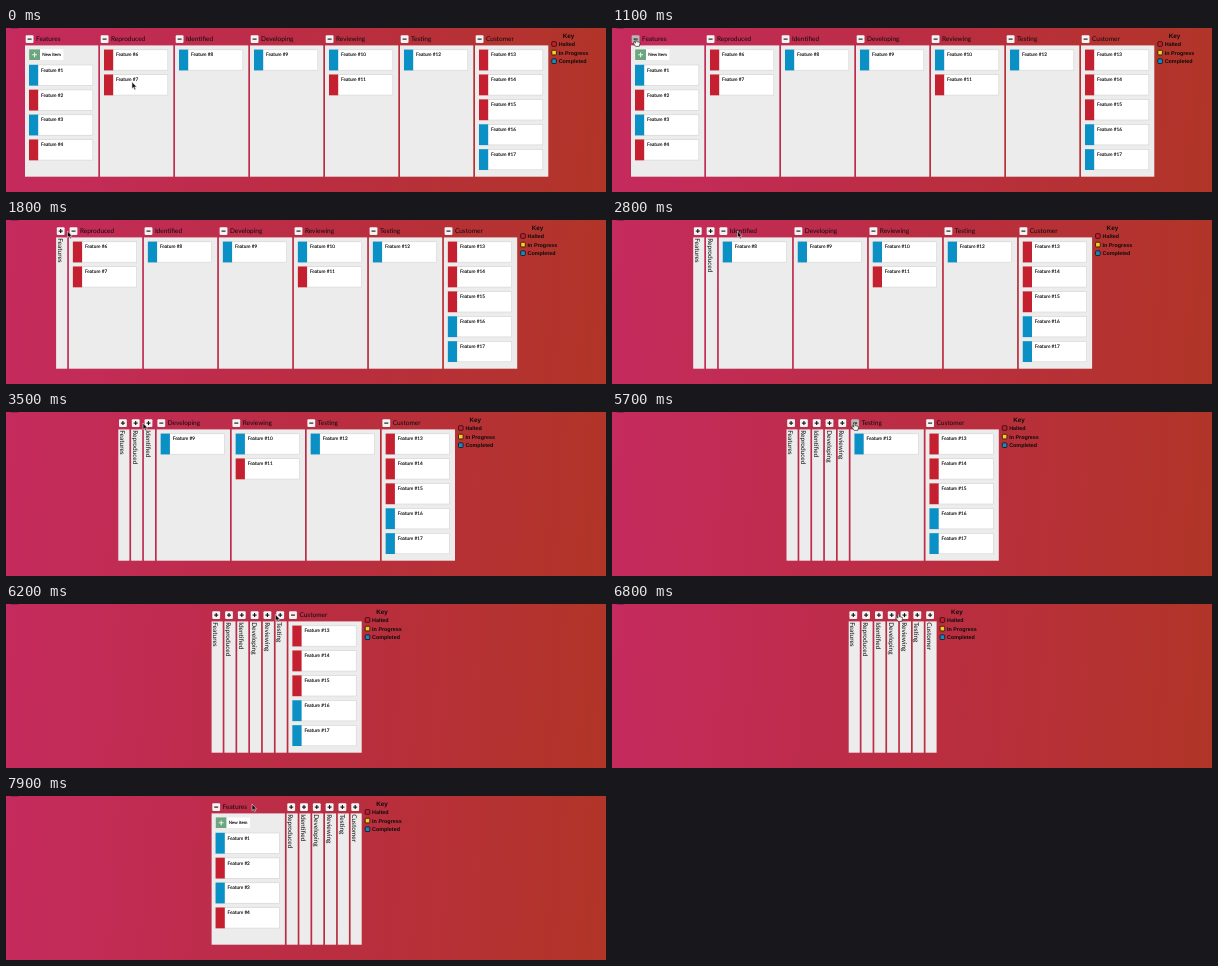
Animation, 600 px wide and 164 px high, one loop 8000 ms. Source, as an HTML page:

```html
<!DOCTYPE html>
<html lang="en">
<head>
<meta charset="utf-8">
<title>Collapsing board</title>
<style>
html, body { margin: 0; width: 100%; height: 100%; overflow: hidden; }
body { background: linear-gradient(94deg, #c52b5e, #bb2d43 50%, #b13527); }
svg { display: block; width: 600px; height: 164px; }
text { font-family: Lato, "Open Sans", sans-serif; fill: #0c0c0c; text-rendering: geometricPrecision; }
.title { font-size: 6.5px; }
.label { font-size: 4.7px; stroke: #0c0c0c; stroke-width: .12px; }
.key text { font-family: "Liberation Sans", Arial, sans-serif; font-weight: 700; font-size: 5.4px; }
.key .head { font-size: 6.3px; text-anchor: middle; }
</style>
</head>
<body>
<svg id="stage" viewBox="0 0 600 164"></svg>
<script>
const LOOP = 8000, OPEN = 75, SHUT = 12.8, GAP = 1.7;
const RED = '#c5202f', BLUE = '#0a90c4', YELLOW = '#f8d01c';

// Column title, first feature number, card colours
const columns = [
  ['Features', 1, 'brbr'],
  ['Reproduced', 6, 'rr'],
  ['Identified', 8, 'b'],
  ['Developing', 9, 'b'],
  ['Reviewing', 10, 'br'],
  ['Testing', 12, 'b'],
  ['Customer', 13, 'rrrbb']
];

// Clicks as [time, column]; each one toggles its column
const clicks = [[1300, 0], [2200, 1], [3100, 2], [4000, 3], [4900, 4], [5800, 5], [6600, 6], [7500, 0]];

// Pointer path as [time, x, y]
const path = [
  [0, 126, 54], [300, 126, 54], [950, 24, 11], [1400, 24, 11],
  [1800, 61.5, 11], [2000, 67, 11], [2350, 67, 11],
  [2700, 125.5, 11], [2800, 125.5, 11], [3000, 111.5, 11], [3250, 111.5, 11],
  [3700, 155, 11], [4000, 155, 11], [4300, 154, 11], [4400, 154, 11],
  [4750, 199, 11], [5050, 199, 11], [5450, 242.5, 11], [6000, 242.5, 11],
  [6350, 286.5, 10], [6850, 286.5, 10], [7250, 241.5, 11], [7600, 241.5, 11],
  [7900, 246, 8], [8000, 246, 8]
];

const stage = document.getElementById('stage');

function add(parent, tag, attrs = {}, text) {
  const el = document.createElementNS('http://www.w3.org/2000/svg', tag);
  for (const k in attrs) el.setAttribute(k, attrs[k]);
  if (text) el.textContent = text;
  parent.appendChild(el);
  return el;
}

const rect = (parent, x, y, width, height, fill, extra) =>
  add(parent, 'rect', { x, y, width, height, fill, ...extra });

function addCard(parent, y, color, number) {
  rect(parent, 4.2, y, 63.6, 20.4, '#fff', { stroke: '#d2d2d2', 'stroke-width': .6 });
  rect(parent, 4, y - .2, 9.2, 20.8, color);
  add(parent, 'text', { x: 16, y: y + 6.6, class: 'label' }, 'Feature #' + number);
}

function addNewItem(parent) {
  rect(parent, 4.2, 21.4, 10.8, 10.6, '#6ca67f');
  add(parent, 'path', { d: 'M9.6 24.4v4.8M7.2 26.8h4.8', stroke: '#e8f3ea', 'stroke-width': 1.1 });
  rect(parent, 15, 21.4, 23.4, 10.6, '#fff');
  add(parent, 'text', { x: 17.2, y: 28.3, class: 'label', style: 'font-size:4.4px' }, 'New item');
}

function addColumn([title, first, colors], index) {
  const root = add(stage, 'g');
  const open = add(root, 'g'), shut = add(root, 'g');
  rect(open, 0, 17.4, OPEN - GAP, 131.3, '#ececec');
  rect(shut, 0, 17.4, SHUT - GAP, 131.3, '#ececec');
  add(open, 'text', { x: 11, y: 13.3, class: 'title' }, title);
  add(shut, 'text', { class: 'title', transform: 'translate(1.7 18.2) rotate(90)' }, title);
  if (index === 0) addNewItem(open);
  const top = index === 0 ? 37 : 21.8;
  [...colors].forEach((c, i) => addCard(open, top + i * 24.9, c === 'r' ? RED : BLUE, first + i));
  const button = rect(root, .7, 7.2, 7.8, 7.8, '#f4f4f4', { rx: 1 });
  const sign = { stroke: '#111', 'stroke-width': 1.1 };
  add(root, 'path', { d: 'M2.6 11.1h4', ...sign });
  add(shut, 'path', { d: 'M4.6 9.1v4', ...sign });
  root.appendChild(shut);
  return { root, open, shut, button };
}

function addKey() {
  const g = add(stage, 'g', { class: 'key' });
  add(g, 'text', { x: 18.6, y: 10.3, class: 'head' }, 'Key');
  [['Halted', RED], ['In Progress', YELLOW], ['Completed', BLUE]].forEach(([name, color], i) => {
    const y = 16 + i * 8.6;
    rect(g, 1.8, y - 2.3, 4.6, 4.6, color, { stroke: '#1a1014', 'stroke-width': .8, rx: .8 });
    add(g, 'text', { x: 8.7, y: y + 1.9 }, name);
  });
  return g;
}

rect(stage, 5, 0, 7, 1, '#5a1a35', { opacity: .45 });
const views = columns.map(addColumn);
const key = addKey();
const outline = { 'stroke-width': .6, 'stroke-linejoin': 'round' };
const arrow = add(stage, 'path', {
  d: 'M0 0V6.6L1.5 5.3L2.6 7.7L3.7 7.2L2.6 4.9H4.6Z', fill: '#0a0a0a', stroke: '#e8d8dc', ...outline
});
const hand = add(stage, 'path', {
  d: 'M-.7 0Q0-.9 .7 0V2.6L3.6 3.3Q4.2 3.6 4 4.6L3.3 7.4H-.4L-2.4 4.5Q-2-.1-.7 4.2Z',
  fill: '#f4f4f4', stroke: '#161616', ...outline
});

function pointerAt(t) {
  const i = path.findIndex(p => p[0] > t);
  const [t0, x0, y0] = path[i - 1], [t1, x1, y1] = path[i];
  const p = (t - t0) / (t1 - t0), e = p * p * (3 - 2 * p);
  return [x0 + (x1 - x0) * e, y0 + (y1 - y0) * e];
}

const show = (el, on) => el.setAttribute('visibility', on ? 'visible' : 'hidden');
const move = (el, x, y = 0) => el.setAttribute('transform', `translate(${x} ${y})`);

function draw(t) {
  const opened = columns.map(() => true);
  const done = clicks.filter(c => c[0] <= t);
  for (const [, i] of done) opened[i] = !opened[i];

  const [px, py] = pointerAt(t);
  const shutCount = opened.filter(o => !o).length;
  let x = 19 + shutCount * (OPEN - SHUT) / 2;
  let pointing = done.length > 0 && t - done[done.length - 1][0] < 250;
  views.forEach((v, i) => {
    move(v.root, x);
    show(v.open, opened[i]);
    show(v.shut, !opened[i]);
    const over = px > x + .7 && px < x + 8.5 && py > 7 && py < 15;
    v.button.setAttribute('fill', over ? '#b9b4b6' : '#f4f4f4');
    pointing = pointing || over;
    x += opened[i] ? OPEN : SHUT;
  });
  move(key, x);
  move(arrow, px, py);
  move(hand, px, py);
  show(arrow, !pointing);
  show(hand, pointing);
}

const start = performance.now();
function tick() {
  draw((performance.now() - start) % LOOP);
  requestAnimationFrame(tick);
}
tick();
</script>
</body>
</html>
```
